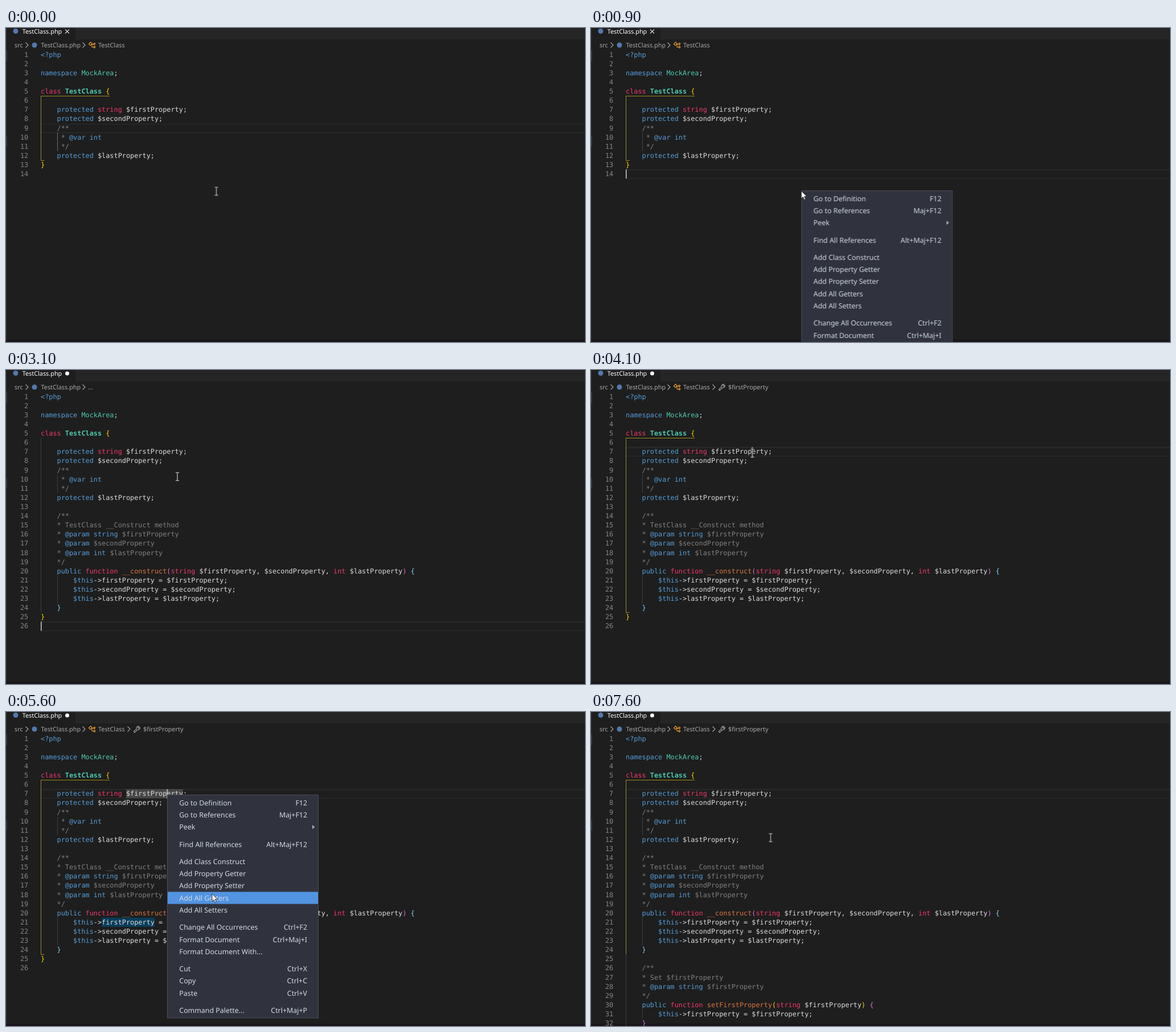
Animation of 1017x551 px, one loop 8 s. Source, as an HTML page:

```html
<!DOCTYPE html>
<html lang="en">
<head>
<meta charset="utf-8">
<title>Editor context menu</title>
<style>
  html, body { margin: 0; width: 100%; height: 100%; overflow: hidden; background: #1e1e1e; }
  svg { display: block; width: 100%; height: 100%; overflow: hidden; }
  text { white-space: pre; text-rendering: geometricPrecision; }
  .code { font: 11.86px "DejaVu Sans Mono", monospace; }
  .bold { font-weight: 700; }
  .ui { font: 10.85px "Noto Sans", sans-serif; fill: #a9a9a9; }
  .menu { font: 12.4px "Noto Sans", sans-serif; fill: #d3dae3; }
  .line { fill: none; stroke: #a9a9a9; stroke-width: 1.1; }
</style>
</head>
<body>
<svg id="stage" viewBox="0 0 1017 551"></svg>
<script>
const LOOP = 8000;
const CHAR = 7.14, LEFT = 61, LINE = 16.11, TOP = 38.7, BASE = 12;
const stage = document.getElementById('stage');

function add(parent, tag, attrs = {}, text) {
  const el = document.createElementNS('http://www.w3.org/2000/svg', tag);
  for (const key in attrs) el.setAttribute(key, attrs[key]);
  if (text !== undefined) el.textContent = text;
  parent.append(el);
  return el;
}
const group = (parent = stage) => add(parent, 'g');
const rect = (parent, x, y, width, height, fill) => add(parent, 'rect', { x, y, width, height, fill });
const path = (parent, d, attrs) => add(parent, 'path', { d, class: 'line', ...attrs });
const label = (parent, x, y, text, attrs) => add(parent, 'text', { x, y, class: 'ui', ...attrs }, text);
const lineTop = n => TOP + (n - 1) * LINE;
const colX = c => LEFT + c * CHAR;

// Holds each value of [time, value] until the next one.
function steps(el, prop, rows) {
  const frames = [...rows, [LOOP, rows[rows.length - 1][1]]].map(([time, value]) =>
    ({ [prop]: value, offset: time / LOOP, easing: 'steps(1, end)' }));
  el.animate(frames, { duration: LOOP, iterations: Infinity });
}

// Makes an element visible only within the given [from, to] spans.
function show(el, ...spans) {
  const rows = spans[0][0] > 0 ? [[0, 'hidden']] : [];
  for (const [from, to] of spans) {
    rows.push([from, 'visible']);
    if (to < LOOP) rows.push([to, 'hidden']);
  }
  steps(el, 'visibility', rows);
  return el;
}

const place = (el, rows) =>
  steps(el, 'transform', rows.map(([t, x, y]) => [t, `translate(${x}px, ${y}px)`]));

// ---- window frame
rect(stage, 0, 0, 1017, 551, '#1e1e1e');
rect(stage, 122, 0, 895, 20, '#252526');
rect(stage, 0, 0, 2, 551, '#252526');
rect(stage, 0, 39, 2, 19, '#37373d');
rect(stage, 0, 190, 2, 18, '#313840');
rect(stage, 0, 547, 1017, 4, '#1a161a');

const fileIcon = (cx, cy) => add(stage, 'circle', { cx, cy, r: 4.5, fill: '#5478ae' });
fileIcon(17, 5.5);
label(stage, 28.7, 10, 'TestClass.php', { style: 'fill:#fff' });
show(path(stage, 'M104 2.5l7 7m0-7l-7 7', { style: 'stroke:#d8d8d8' }), [0, 3100]);
show(add(stage, 'circle', { cx: 107.5, cy: 6, r: 3.5, fill: '#fff' }), [3100, LOOP]);

// ---- breadcrumbs
const chevron = (parent, x) => path(parent, `M${x - 2} 25.5l4.5 4.5l-4.5 4.5`);
label(stage, 15, 34, 'src');
chevron(stage, 36.5);
fileIcon(50, 30);
label(stage, 61.5, 34, 'TestClass.php');
chevron(stage, 136.5);

const classCrumb = show(group(), [0, 1000], [4100, LOOP]);
path(classCrumb, 'M145.5 28l3.2-3.2l2.6 2.6l-3.2 3.2zM150.5 28.5h3M151 28.5v5h2.5M153.5 28l1.8-1.8l1.6 1.6l-1.8 1.8zM153.5 33.5l1.8-1.8l1.6 1.6l-1.8 1.8z',
  { style: 'stroke:#ee9d28' });
label(classCrumb, 162, 34, 'TestClass');

show(label(stage, 144, 34, '…'), [1000, 4100]);

const propCrumb = show(group(), [4100, LOOP]);
chevron(propCrumb, 215.5);
path(propCrumb, 'M233.5 25.2a3.3 3.3 0 0 0-4.3 4.2l-4.3 4.2a1.2 1.2 0 0 0 1.7 1.7l4.3-4.3a3.3 3.3 0 0 0 4.1-4.3l-1.9 1.9l-1.6-1.6z');
label(propCrumb, 241, 34, '$firstProperty');

// ---- current line, word marks and guides
const current = add(stage, 'rect', {
  x: 61.5, y: .8, width: 970, height: LINE - 1.2, fill: 'none', stroke: '#2c2c2c', 'stroke-width': 1.5
});
place(current, [[0, 9], [900, 14], [3100, 26], [3900, 7]].map(([t, n]) => [t, 0, lineTop(n)]));

const marks = show(group(), [4400, 7000]);
rect(marks, colX(21), lineTop(7), 14 * CHAR, LINE, '#474747');
rect(marks, colX(15), lineTop(21), 13 * CHAR, LINE, '#083d5a');

function guide(col, first, last, color = '#404040') {
  const y = lineTop(first);
  return rect(stage, Math.round(colX(col)), y, 1, lineTop(last + 1) - y, color);
}
function scope(last, ...spans) {
  const g = show(group(), ...spans);
  const end = Math.round(lineTop(last + 1));
  rect(g, 61, 119, 121, 1, '#9a8b18');
  rect(g, 61, 119, 1, end - 119, '#95893a');
  return { foot: rect(g, 61, end, 6.5, 1, '#9a8b18') };
}
guide(0, 6, 12);
show(guide(0, 13, 24), [3100, LOOP]);
show(guide(0, 25, 32), [7000, LOOP]);
guide(4, 10, 11);
show(guide(4, 10, 11, '#707070'), [0, 900]);
show(guide(4, 21, 23), [3100, LOOP]);
show(guide(4, 31, 31), [7000, LOOP]);
scope(12, [0, 1000]);
show(scope(24, [3900, LOOP]).foot, [3900, 7000]);

// ---- code: "~" plus a letter switches the colour
const INK = {
  b: '#569cd6', r: '#f0386a', g: '#4ec9b0', G: '#4ec9b0', w: '#dcdcdc', c: '#808080',
  o: '#d9743f', y: '#ffd700', p: '#da70d6', s: '#87cefa'
};

function code(parent, first, source) {
  source.split('\n').forEach((row, i) => {
    const y = lineTop(first + i) + BASE;
    let col = 0;
    for (const part of row.split('~')) {
      const ink = part[0], text = part.slice(1), body = text.trimStart();
      if (body) add(parent, 'text', {
        x: colX(col + text.length - body.length), y, fill: INK[ink],
        class: ink === 'G' ? 'code bold' : 'code'
      }, body);
      col += text.length;
    }
  });
}
function numbers(parent, from, to) {
  for (let n = from; n <= to; n++)
    add(parent, 'text', { x: 39.2, y: lineTop(n) + BASE, class: 'code', fill: '#858585', 'text-anchor': 'end' }, n);
}

const head = group();
numbers(head, 1, 14);
code(head, 1, `~b<?php

~bnamespace ~gMockArea~w;

~rclass ~GTestClass ~y{

~b    protected ~rstring ~w$firstProperty;
~b    protected ~w$secondProperty;
~c    /**
~c     * ~b@var int
~c     */
~b    protected ~w$lastProperty;`);

code(show(group(), [0, 3100]), 13, '~y}');

const construct = show(group(), [3100, LOOP]);
numbers(construct, 15, 26);
code(construct, 14, `~c    /**
~c    * TestClass __Construct method
~c    * ~b@param string ~c$firstProperty
~c    * ~b@param ~c$secondProperty
~c    * ~b@param int ~c$lastProperty
~c    */
~b    public ~rfunction ~o__construct~p(~rstring ~w$firstProperty, $secondProperty, ~rint ~w$lastProperty~p) ~s{
~b        $this~w->firstProperty = $firstProperty;
~b        $this~w->secondProperty = $secondProperty;
~b        $this~w->lastProperty = $lastProperty;
~s    }`);

code(show(group(), [3100, 7000]), 25, '~y}');

const setter = show(group(), [7000, LOOP]);
numbers(setter, 27, 32);
code(setter, 26, `~c    /**
~c    * Set $firstProperty
~c    * ~b@param string ~c$firstProperty
~c    */
~b    public ~rfunction ~osetFirstProperty~y(~rstring ~w$firstProperty~y) ~p{
~b        $this~w->firstProperty = $firstProperty;
~p    }`);

// ---- text caret
const caret = rect(stage, 0, 0, 1.6, LINE, '#c4c4c2');
place(caret, [[0, 14, 0], [3100, 26, 0], [3900, 7, 31]].map(([t, n, c]) => [t, colX(c), lineTop(n)]));
show(caret, [900, 1200], [1700, 2200], [2500, 3500], [3900, 5000], [5400, 5900], [6400, 7400]);

// ---- context menu
const ROW = 21.2, GAP = 9.3;
const ITEMS = [
  ['Go to Definition', 'F12'], ['Go to References', 'Maj+F12'], ['Peek', '>'], null,
  ['Find All References', 'Alt+Maj+F12'], null,
  ['Add Class Construct'], ['Add Property Getter'], ['Add Property Setter'],
  ['Add All Getters'], ['Add All Setters'], null,
  ['Change All Occurrences', 'Ctrl+F2'], ['Format Document', 'Ctrl+Maj+I'], ['Format Document With...'], null,
  ['Cut', 'Ctrl+X'], ['Copy', 'Ctrl+C'], ['Paste', 'Ctrl+V'], null,
  ['Command Palette...', 'Ctrl+Maj+P']
];
const rows = [];
let nextY = 3.6;
for (const item of ITEMS) {
  if (item) rows.push({ y: nextY, name: item[0], keys: item[1] });
  nextY += item ? ROW : GAP;
}

function menu(x, y, from, to, moves) {
  const g = add(show(group(), [from, to]), 'g', { transform: `translate(${x} ${y})` });
  steps(g, 'opacity', [[0, .7], [from + 200, 1]]);
  add(g, 'rect', { x: .5, y: .5, width: 265, height: 391.5, fill: '#30333e', stroke: '#4b4e59' });

  const hover = rect(g, 1, 0, 264, ROW, '#5294e2');
  const hits = moves.slice(1).map(([t, , py]) =>
    [t, 0, (rows.find(r => py - y >= r.y && py - y < r.y + ROW) || { y: -2000 }).y]);
  place(hover, [[0, 0, -2000], ...hits]);

  for (const { y: top, name, keys } of rows) {
    const base = top + 15;
    label(g, 21.3, base, name, { class: 'menu' });
    if (keys === '>') path(g, `M255 ${top + 7.2}l4.4 3.6l-4.4 3.6z`, { class: '', fill: '#a4aab4' });
    else if (keys) label(g, 246, base, keys, { class: 'menu', 'text-anchor': 'end' });
  }
}

const firstMoves = [
  [700, 369.5, 286], [1200, 374, 297], [1300, 384, 318], [1400, 395, 340],
  [1500, 405, 363], [1600, 413, 382], [1700, 420, 397], [1800, 423, 404.5]
];
const secondMoves = [
  [4400, 283, 145], [5000, 318, 187], [5200, 338, 248], [5400, 352, 279], [5600, 362, 319],
  [5700, 366, 320], [5900, 365, 317], [6100, 363, 306], [6300, 362, 303], [6400, 362, 302]
];
menu(369.5, 285, 700, 2500, firstMoves);
menu(283, 145, 4400, 7000, secondMoves);

// ---- mouse pointers
const arrow = path(stage, 'M0 0V13.2L3 10.5L5.2 15.4L7.4 14.4L5.2 9.7H9.4Z',
  { class: '', fill: '#fff', stroke: '#26262a', 'stroke-width': .9 });
place(arrow, [[0, 369.5, 286], ...firstMoves, ...secondMoves]);
show(arrow, [700, 2500], [4400, 7000]);

const beam = group();
const beamShape = 'M-3.2-7h2.4l.8.7l.8-.7h2.4M0-6.3V6.3M-3.2 7h2.4l.8-.7l.8.7h2.4';
path(beam, beamShape, { style: 'stroke:#111;stroke-width:2.4' });
path(beam, beamShape, { style: 'stroke:#e4e4e4' });
place(beam, [
  [0, 369.5, 286.5], [2500, 425, 408], [3100, 301, 187], [3300, 286, 160], [3500, 289, 147.5],
  [3700, 283.5, 146], [7000, 362, 304], [7300, 342, 272], [7400, 327, 243], [7600, 315.5, 220.5]
]);
show(beam, [0, 700], [2500, 4400], [7000, LOOP]);
</script>
</body>
</html>
```
